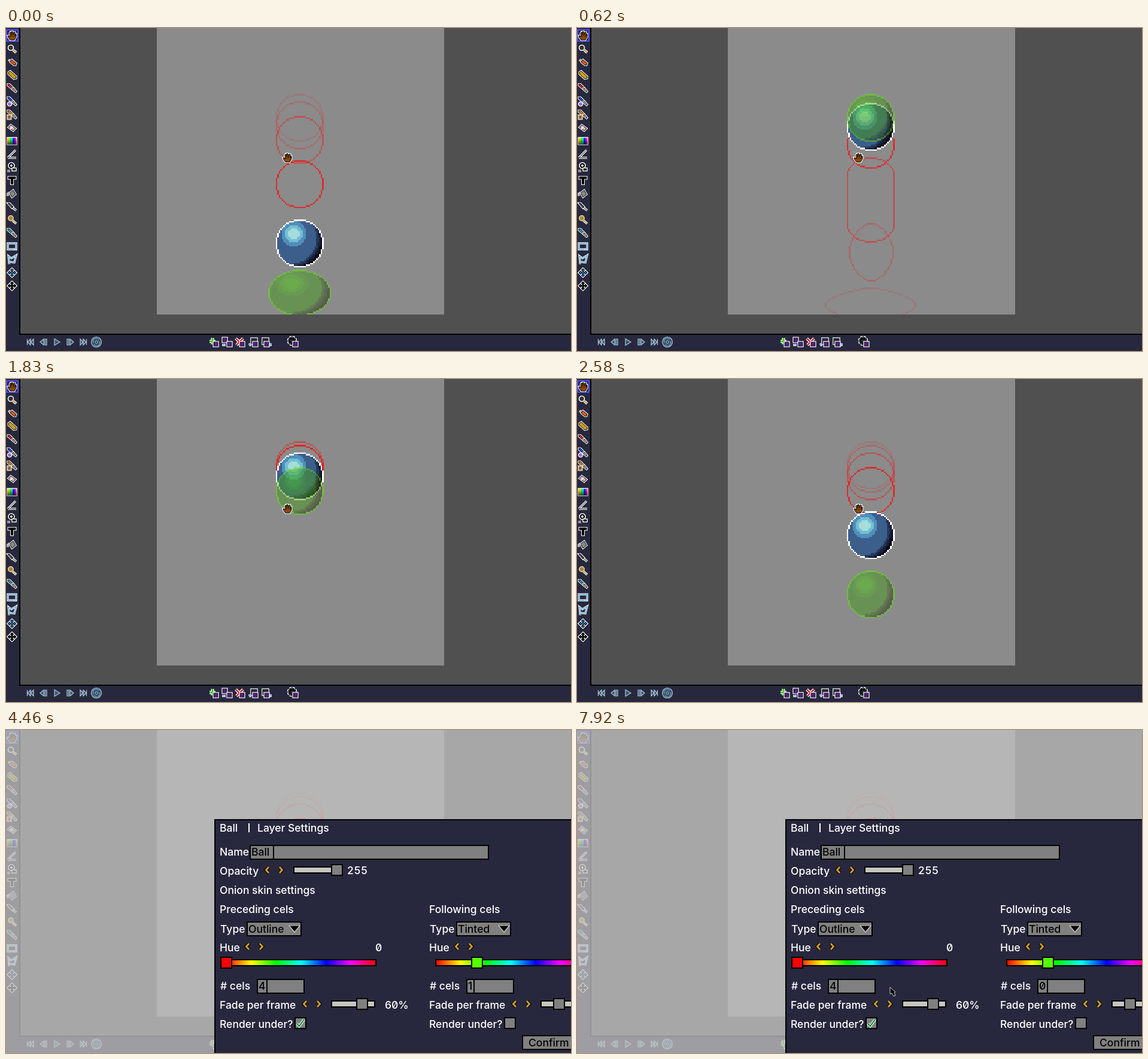
These frames come from a looping animation (944 px wide and 540 px high, 8000 ms). An HTML page:

```html
<!DOCTYPE html>
<html lang="en">
<head>
<meta charset="utf-8">
<title>Onion skin settings</title>
<style>
html, body { margin: 0; width: 100%; height: 100%; overflow: hidden; background: #505050; }
svg { display: block; width: 944px; height: 540px; }
text { font: 500 17.5px Inter, sans-serif; font-feature-settings: "zero"; fill: #fff; white-space: pre; }
text.dark { fill: #000; }
text.digits { letter-spacing: 1px; }
</style>
</head>
<body>
<svg id="stage" viewBox="0 0 944 540" xmlns="http://www.w3.org/2000/svg"></svg>
<script>
const stage = document.getElementById('stage');
const BAR = '#27283d', GREY = '#808080';

// ---- ball cels: x, y, width, height, roundness, straight part ----
const PX = 2.5;
const round = y => [450.5, y, 80, 80, 2, 0];
const CELS = [
  round(110), round(122.5), round(147), round(221), round(320),
  [438, 404, 105, 77.5, 2, 0],
  [414, 434, 152.5, 57.5, 1.65, 0],
  [454, 326, 75, 97.5, 1.8, 0],
  [450.5, 216, 80, 142.5, 2, 0.56],
  round(155), round(125), round(110), round(104)
];
const BLUE = ['#a4dddb', '#73bed3', '#4f8fba', '#3c5e8b', '#253a5e', '#172038', '#090a14', '#fff'];
const GREEN = ['#4eca18', '#4cbc1c', '#4ba81e', '#489a22', '#406c20', '#364c1c', '#2a3414', '#5ae60a'];

function band(x, y) {
  const lit = Math.hypot(x + 4, y + 6.5);
  if (lit < 8.5) return lit < 3.8 ? 0 : lit < 6 ? 1 : 2;
  const dim = Math.hypot(x + 5.6, y + 3.2);
  return dim < 16.8 ? 3 : dim < 18.2 ? 4 : dim < 19.8 ? 5 : 6;
}

// One path per shade; the last one is the outline.
function bake([x, y, w, h, n, s]) {
  const W = Math.round(w / PX), H = Math.round(h / PX), paths = Array(8).fill('');
  const inside = (i, j) => {
    const u = Math.abs(2 * i + 1 - W) / W;
    const v = Math.max(0, Math.abs(2 * j + 1 - H) / H - s) / (1 - s);
    return u ** n + v ** n <= 1;
  };
  const shade = (i, j) => {
    if (!inside(i, j)) return -1;
    if (!inside(i - 1, j) || !inside(i + 1, j) || !inside(i, j - 1) || !inside(i, j + 1)) return 7;
    return band((2 * i + 1 - W) / W * 16, (2 * j + 1 - H) / H * 16);
  };
  for (let j = 0; j < H; j++) {
    for (let i = 0, k; i < W; i = k) {
      const c = shade(i, j);
      for (k = i + 1; k < W && shade(k, j) === c;) k++;
      if (c >= 0) paths[c] += `M${i} ${j}h${k - i}v1h${i - k}z`;
    }
  }
  return { at: `translate(${x} ${y}) scale(${PX})`, paths };
}
const baked = CELS.map(bake);

function solid(k, colors, alpha) {
  const b = baked[k];
  return `<g transform="${b.at}" opacity="${alpha}">` +
    b.paths.map((d, i) => `<path d="${d}" fill="${colors[i]}"/>`).join('') + '</g>';
}
const ring = (k, alpha) =>
  `<path transform="${baked[k].at}" d="${baked[k].paths[7]}" fill="#f00" opacity="${alpha}"/>`;

function onion(k) {
  const N = CELS.length;
  let out = '';
  for (let back = 4; back > 0; back--) out += ring((k - back + N) % N, 0.66 * 0.6 ** (back - 1));
  return out + solid(k, BLUE, 1) + solid((k + 1) % N, GREEN, 0.52);
}

// ---- drawing helpers ----
const box = (x, y, w, h, fill, extra = '') =>
  `<rect x="${x}" y="${y}" width="${w}" height="${h}" fill="${fill}" ${extra}/>`;
const frame = (x, y, w, h, fill, extra = '') =>
  box(x + 1, y + 1, w - 2, h - 2, fill, 'stroke="#000" stroke-width="2" ' + extra);
const label = (x, y, s, cls = '', extra = '') => `<text x="${x}" y="${y}" class="${cls}" ${extra}>${s}</text>`;
const at = (x, y, s) => `<g transform="translate(${x} ${y})">${s}</g>`;
// filled shape with a black line and a white rim
const shape = (d, fill) =>
  `<path d="${d}" fill="#fff" stroke="#fff" stroke-width="3"/><path d="${d}" fill="${fill}" stroke="#000" stroke-width="1"/>`;
// open line with a rim
const line = (d, color, rim = '#fff', w = 2) =>
  `<path d="${d}" fill="none" stroke="${rim}" stroke-width="${w + 2.4}"/><path d="${d}" fill="none" stroke="${color}" stroke-width="${w}"/>`;

const HAND = 'M-7 0L-5 0 -3 2 -4 -4 -3 -6 -1 -5 -1 -1 -1 -7 1 -7 2 -1 3 -6 5 -6 5 0 6 -3 7 -3 7 2 5 5 4 7 -3 7 -6 3Z';
const hand = shape(HAND, '#8a4a10') + '<path d="M-1 -4V2M2 -4V2M4.5 -3V2" stroke="#4a2408" fill="none"/>';
const brush = c => shape('M-7 -7L-4 -7 2 -1 0 1 -7 -5Z', c) + shape('M1 0L3 0 7 5 6 6 1 2Z', '#d8c8a8');
const move = c => shape('M0 -7L3 -4H1V-1H4V-3L7 0 4 3V1H1V4H3L0 7 -3 4H-1V1H-4V3L-7 0 -4 -3V-1H-1V-4H-3Z', c);

const TOOLS = [
  hand,
  line('M2 2L7 6', '#c08a20') + '<circle cx="-2" cy="-2" r="4.5" fill="#333" stroke="#fff" stroke-width="1.6"/>',
  shape('M-3 -2L0 -4 7 2 6 5 3 5 -3 0Z', '#d25a24') + line('M-6 -4L-3 -2', '#d25a24', '#fff', 1.4),
  shape('M-6 -5L-3 -7 7 2 7 5 3 6 -6 -2Z', '#d0a000'),
  brush('#e02020'),
  brush('#2848e0') + '<circle cx="-4" cy="4" r="3.6" fill="#c050d0" stroke="#fff" stroke-width="1.4"/><path d="M-4 4V1A3 3 0 0 1 -1 4Z" fill="#40d0c0"/>',
  brush('#e08a18') + box(-8, 0, 7, 8, '#b88a50', 'stroke="#fff"') + '<path d="M-6 3H-3M-6 5H-3" stroke="#402000"/>',
  shape('M-6 -1L-2 -5 6 1 2 5Z', '#d8b0b0') + '<path d="M-3 2L1 -2" stroke="#fff" stroke-width="2"/>',
  box(-8, -6, 16, 12, 'url(#rainbow)', 'stroke="#fff" stroke-width="1.4"') + box(-8, -6, 16, 12, 'url(#shade)'),
  line('M-7 6L6 -7M-7 6H7', '#000', '#fff', 1),
  '<circle cx="-1" cy="-3" r="5" fill="#000" stroke="#fff" stroke-width="1.6"/><circle cx="-1" cy="-3" r="2" fill="#fff"/>' +
    box(0, 1, 7, 5, '#000', 'stroke="#fff" stroke-width="1.4"') + line('M-8 6H-3', '#000', '#fff', 1),
  shape('M-6 -6H6V-3H1.5V6H-1.5V-3H-6Z', '#000'),
  shape('M-4 -1L2 -6 6 1 0 6Z', '#888') + line('M-7 4V0L-4 -2', '#888', '#ddd', 1),
  shape('M-7 -6L-4 -6 2 0 0 2Z', '#555') + line('M2 2L7 6', '#555', '#fff', 1.6),
  line('M1 1L7 6', '#b08030', '#fff', 1.6) + '<circle cx="-2" cy="-3" r="4.2" fill="#a88440" stroke="#f0dca0" stroke-width="1.5"/>',
  brush('#28a0b0'),
  line('M-7 -5H7V5H-7Z', '#2878a8', '#e4f4ff', 0.9) + line('M5 3V7', '#205878', '#fff', 0.8),
  line('M-6 -6L-1 -2 7 -7 4 5 -5 4Z', '#2878a8', '#e4f4ff', 0.9) + line('M-7 6H-3', '#000', '#fff', 0.8),
  move('#1878c8'), move('#111')
];

const ICE = '#b0c8d8';
const play = d => `<path d="${d}" fill="#35566f" stroke="${ICE}" stroke-width="1.2"/>`;
const FIRST = play('M-5.5 -5V5M0 -5L-5 0 0 5ZM5 -5L0 0 5 5Z');
const BACK = play('M0 -5L-6 0 0 5ZM2 -5V5H5V-5Z');
const flip = s => `<g transform="scale(-1 1)">${s}</g>`;
const purple = (x, y) => box(x, y, 9, 9, '#2c1048', 'stroke="#fff" stroke-width="1.2"') +
  `<path d="M${x + 2} ${y + 3}h5M${x + 2} ${y + 6}h5" stroke="#7838a0" stroke-width="1.4"/>`;
const page = line('M-3 -6H6V3H-3Z', '#000', '#fff', 1.2) + box(-3, -6, 9, 9, BAR);
const gear = '<circle r="5.5" cx="-1" cy="-2" fill="none" stroke="#fff" stroke-width="5.6" stroke-dasharray="3 1.32"/>' +
  '<circle r="5" cx="-1" cy="-2" fill="none" stroke="#000" stroke-width="3.6" stroke-dasharray="2.4 1.53"/>' +
  '<circle r="3.6" cx="-1" cy="-2" fill="none" stroke="#000" stroke-width="2"/>';
const BUTTONS = [
  [41, FIRST], [63, BACK], [85, play('M-4 -5.5L5 0 -4 5.5Z')], [107, flip(BACK)], [129, flip(FIRST)],
  [151, `<circle r="8.5" fill="#35566f" stroke="${ICE}" stroke-width="1.2"/><path d="M-5 1A5 5 0 0 1 4 -4M5 -1A5 5 0 0 1 -4 4" fill="none" stroke="#7a9cb0" stroke-width="1.4"/><circle r="2" fill="${BAR}" stroke="${ICE}"/>`],
  [347, line('M-7 -1H3M-2 -7V4', '#40c020', '#fff', 2.6) + purple(-1, -1)],
  [369, purple(-8, -8) + line('M-6 3V5H-2', '#3080e0', '#fff', 1) + purple(0, -1)],
  [391, line('M-7 -6L4 5M5 -6L-6 5', '#d81020', '#fff', 2.4) + purple(-1, -1)],
  [413, page + purple(-1, -1) + line('M-7 5H-3M-7 5L-5 3', '#3080e0', '#fff', 1)],
  [435, page.replace(/-3/g, '-6').replace(/H6/g, 'H3') + purple(-4, -1) + line('M7 2V5H4', '#3080e0', '#fff', 1)],
  [479, gear + purple(0, -1)]
];

// ---- settings dialog ----
const chevron = (x, y, s) => at(x, y, line(`M${2 * s} -5L${-2.5 * s} 0 ${2 * s} 5`, '#d09a28', '#000', 3));
const arrows = (x, y) => chevron(x, y, 1) + chevron(x + 22, y, -1);
const slider = (x, y, w, knob) => frame(x, y, w, 12, '#c6c6c0') + frame(knob, y - 4, 20, 20, GREY);
const caret = (x, y, extra = '') => box(x, y, 2, 21, '#000', extra);

function column(dx, o) {
  return `<g transform="translate(${dx} 0)">` +
    label(357, 306, o.title) +
    label(358, 339, 'Type') + frame(402, 320, 92, 25, GREY) + label(405, 339, o.type, 'dark') +
    '<path d="M473 327H491L482 338Z" stroke="#ccc" stroke-width="1.2"/>' +
    label(357, 370, 'Hue') + arrows(404, 362) + label(617, 370, o.hue) +
    frame(367, 383, 252, 12, 'url(#rainbow)') + frame(o.hueX, 379, 20, 20, o.color) +
    label(358, 434, '# cels') + frame(419, 416, 80, 25, GREY, o.id ? 'id="field"' : '') +
    (o.id ? box(421, 418, 10, 21, '#4355c4', 'id="pick"') : '') +
    label(422, 434, o.cels, 'dark', o.id ? 'id="count"' : '') +
    caret(o.id ? 431 : 435, 418, o.id ? 'id="caret"' : '') +
    label(357, 466, 'Fade per frame') + arrows(500, 458) + slider(543, 452, 74, o.fadeX) + label(633, 466, o.fade) +
    label(357, 498, 'Render under?') + frame(482, 480, 20, 20, GREY) +
    (o.under ? line('M486 491L490 495 498 484', '#187830', '#dfe', 1.8) : '') +
    '</g>';
}

const dialog =
  box(0, 0, 944, 540, '#c5c5c5', 'opacity=".75"') +
  frame(348, 149, 620, 420, BAR) +
  label(357, 170, 'Ball') + box(405, 156, 2, 15, '#fff') + label(420, 170, 'Layer Settings') +
  label(357, 210, 'Name') + frame(407, 192, 400, 25, GREY) + label(410, 210, 'Ball', 'dark') + caret(446, 194) +
  label(357, 242, 'Opacity') + arrows(437, 234) + slider(480, 228, 74, 543) + label(570, 241, '255', 'digits') +
  label(357, 274, 'Onion skin settings') +
  column(0, { title: 'Preceding cels', type: 'Outline', hue: 0, hueX: 358, color: '#f00', cels: 4, fadeX: 585, fade: '60%', under: true }) +
  column(350, { title: 'Following cels', type: 'Tinted', hue: 100, hueX: 427, color: '#5f0', cels: 1, fadeX: 564, fade: '40%', id: true }) +
  frame(862, 510, 100, 25, GREY) + label(873, 529, 'Confirm', 'dark');

const hues = [...Array(13).keys()].map(i => `<stop offset="${i / 12}" stop-color="hsl(${i * 30} 100% 50%)"/>`).join('');
stage.innerHTML =
  `<defs><linearGradient id="rainbow">${hues}</linearGradient>
  <linearGradient id="shade" x2="0" y2="1"><stop offset=".2" stop-opacity="0"/><stop offset="1" stop-opacity=".7"/></linearGradient>
  <clipPath id="paper"><rect x="252" width="480" height="479"/></clipPath></defs>` +
  box(0, 0, 944, 540, '#505050') + box(252, 0, 480, 479, '#8b8b8b') +
  '<g clip-path="url(#paper)"><g id="ball" shape-rendering="crispEdges"></g></g>' +
  box(22, 511, 922, 29, BAR) + box(22, 511, 922, 2, '#000') +
  box(0, 0, 22, 540, BAR) + box(22, 0, 2, 513, '#000') +
  box(1, 3, 19, 19, '#24245c', 'stroke="#5050e8" stroke-width="2"') +
  TOOLS.map((s, i) => at(10, 13 + 22 * i, s)).join('') +
  BUTTONS.map(([x, s]) => at(x, 525, s)).join('') +
  `<g id="hand">${hand}</g><g id="dialog">${dialog}</g>` +
  '<path id="arrow" d="M0 0L0 11 3 10 6 15 9 14 7 9 9 8Z" fill="#000" stroke="#fff" stroke-width=".8"/>';

// ---- timeline: [time, value] ----
const last = (list, t) => list.reduce((v, [at, x]) => (t >= at ? x : v), null);
const POSE = [[0, 4], [370, 6], [500, 8], [620, 10], [1260, 11], [1360, 0], [1830, 1], [1960, 2], [2580, 3]];
const GRAB = [[0, [470, 217]], [2910, [471, 245]], [3020, [472, 318]], [3140, [473, 405]], [3250, [474, 480]], [3360, null]];
const POINT = [[4800, [475, 525]], [4920, [570, 500]], [5050, [672, 470]], [5170, [745, 450]], [5290, [773, 441]],
  [5530, [777, 437]], [5650, [778, 433]], [7680, [730, 433]], [7800, [590, 431]], [7920, [523, 430]]];

const $ = id => document.getElementById(id);
const show = (el, on) => el.setAttribute('display', on ? 'inline' : 'none');
function place(el, p) {
  show(el, p);
  if (p) el.setAttribute('transform', `translate(${p[0]} ${p[1]})`);
}

let shown = -1;
function draw(t) {
  const pose = last(POSE, t);
  if (pose !== shown) $('ball').innerHTML = onion(shown = pose);
  place($('hand'), last(GRAB, t));
  place($('arrow'), last(POINT, t));
  show($('dialog'), t >= 4460);

  const hover = t >= 5530 && t < 7680, typed = t >= 7310;
  const ink = hover ? '#18247c' : '#000';
  $('field').setAttribute('fill', hover ? '#6070b8' : GREY);
  show($('pick'), t >= 6130 && !typed);
  $('count').textContent = typed ? '0' : '1';
  $('count').style.fill = ink;
  $('caret').setAttribute('fill', ink);
  $('caret').setAttribute('x', typed ? 435 : 431);
}

function tick() {
  draw(performance.now() % 8000);
  requestAnimationFrame(tick);
}
tick();
</script>
</body>
</html>
```
